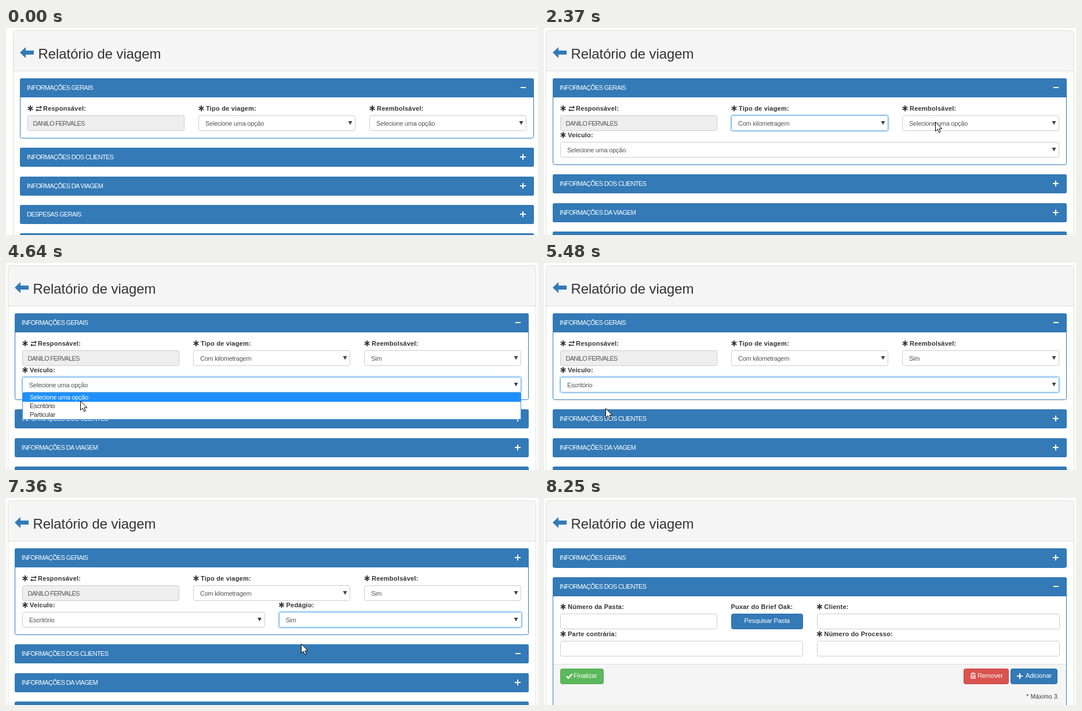
Animation of 918 by 358 pixels, one loop 8820 ms. Source, as an HTML page:

```html
<!DOCTYPE html>
<html lang="pt-BR">
<head>
<meta charset="utf-8">
<title>Relatório de viagem</title>
<style>
html, body { margin: 0; width: 100%; height: 100%; overflow: hidden; background: #fff; }
svg { display: block; }
text { font: 11px "Liberation Sans", Arial, sans-serif; letter-spacing: -.25px; fill: #555; white-space: pre; }
.h1 { font-size: 24px; letter-spacing: -.08px; fill: #333; }
.cap { letter-spacing: -.68px; fill: #fff; }
.name { letter-spacing: -.75px; }
.label { font-weight: bold; letter-spacing: .22px; fill: #333; }
.btn { letter-spacing: -.1px; fill: #fff; }
.opt { fill: #333; }
.on { fill: #fff; }
.note { font-size: 10px; letter-spacing: .35px; fill: #333; }
</style>
</head>
<body>
<svg id="stage" width="918" height="358" viewBox="0 0 918 358"></svg>
<script>
const LOOP = 8820, BLUE = '#337ab7', GRAY = '#ddd';
const stage = document.getElementById('stage');

// Bursts of screen updates: start, end, number of steps
const BURSTS = [
  [50, 500, 8], [750, 1320, 9], [1620, 1620, 1], [1820, 2370, 10], [2620, 3000, 7],
  [3270, 3270, 1], [3430, 3430, 1], [3680, 4520, 13], [4590, 5050, 8],
  [5360, 6120, 12], [6440, 6930, 9], [7360, 7700, 6], [7870, 8250, 7]
];
// Pointer path: time, x, y
const POINTER = [
  [50, 822, 345], [500, 554, 172], [750, 554, 172], [880, 554, 170], [1320, 483, 202],
  [1619, 483, 202], [1620, 483, 203], [1820, 483, 203], [2370, 675, 162], [2620, 675, 162],
  [3000, 675, 200], [3269, 675, 200], [3270, 676, 200], [3680, 676, 200], [4520, 145, 212],
  [4590, 128, 238], [5050, 95, 252], [5360, 95, 252], [6120, 555, 208], [6440, 555, 208],
  [6720, 490, 246], [6930, 509, 252], [7360, 509, 252], [7480, 509, 240], [7870, 509, 240],
  [8187, 733, 342]
];

const clamp = v => Math.max(0, Math.min(1, v));
const within = (t, a, b) => t >= a && t < b;
const swing = (t, start, len) => .5 - Math.cos(Math.PI * clamp((t - start) / len)) / 2;
const grow = (full, r, bump) => full * r + bump * r * (1 - r);

function snap(t) {
  let at = 0;
  for (const [start, end, n] of BURSTS) {
    if (t < start) break;
    const step = (end - start) / (n - 1 || 1);
    at = step ? Math.min(end, start + Math.floor((t - start) / step + .2) * step) : start;
  }
  return at;
}

function pointerAt(t) {
  const i = POINTER.findIndex(p => p[0] > t);
  if (i < 0) return POINTER[POINTER.length - 1].slice(1);
  if (!i) return POINTER[0].slice(1);
  const [a, b] = [POINTER[i - 1], POINTER[i]];
  const u = (t - a[0]) / (b[0] - a[0]), k = u * u * (3 - 2 * u);
  return [1, 2].map(j => Math.round(a[j] + (b[j] - a[j]) * k));
}

const text = (x, y, s, cls = '', extra = '') => `<text x="${x}" y="${y}" class="${cls}" ${extra}>${s}</text>`;
const rect = (x, y, w, h, fill, extra = '') =>
  `<rect x="${x}" y="${y}" width="${Math.max(0, w)}" height="${Math.max(0, h)}" fill="${fill}" ${extra}/>`;
const box = (x, y, w, h, fill, line, r = 3) => rect(x + .5, y + .5, w - 1, h - 1, fill, `stroke="${line}" rx="${r}"`);
const path = (x, y, d, attrs) => `<path transform="translate(${x} ${y})" d="${d}" ${attrs}/>`;
const clip = (y, h, body, opacity) => h < .5 ? '' :
  `<svg x="0" y="${y}" width="930" height="${h}" viewBox="0 ${y} 930 ${h}" opacity="${opacity}">${body}</svg>`;

const star = (x, y) => path(x + 5, y - 4, 'M0-5V5M-4.3-2.5L4.3 2.5M-4.3 2.5L4.3-2.5', 'stroke="#333" stroke-width="2"');
const swap = (x, y) => path(x, y - 9, 'M1 2.5H8V0L11 3 8 6V4H1ZM10 7.5H3V5.5L0 8 3 10.5V9H10Z', 'fill="#333"');
const plus = (x, y, s = 5) => path(x, y, `M${-s} 0H${s}M0 ${-s}V${s}`, 'stroke="#fff" stroke-width="2"');
const minus = (x, y) => rect(x - 4, y - 1, 9, 2, '#fff');

function label(x, y, s, icon) {
  return star(x, y) + (icon ? swap(x + 14, y) : '') + text(x + (icon ? 27 : 13), y, s, 'label');
}

function control(x, y, w, glow) {
  x = Math.round(x); w = Math.round(w);
  return (glow ? rect(x - 1, y - 1, w + 2, 29, 'none', 'rx="4" stroke="#66afe9" stroke-opacity=".35" stroke-width="2"') : '') +
    box(x, y, w, 27, '#fff', glow ? '#66afe9' : '#ccc');
}

function select(x, y, w, value, glow) {
  return control(x, y, w, glow) + text(x + 12, y + 18, value) +
    path(x + w - 9, y + 10, 'M-3.5 0H3.5L0 6.5Z', 'fill="#444"');
}

function button(x, y, w, fill, line, s, dx, icon = '') {
  return box(x, y, w, 27, fill, line) + icon + text(x + dx, y + 16, s, 'btn');
}

function list(x, y, w, items, mouseY) {
  const row = Math.floor((mouseY - y - 1) / 15);
  const active = row >= 0 && row < items.length ? row : 0;
  return box(x, y, w, 47, '#fff', '#3c8fe0', 0) + items.map((s, i) =>
    (i === active ? rect(x + 1, y + 1 + 15 * i, w - 2, 15, '#1e90ff') : '') +
    text(x + 13, y + 12 + 15 * i, s, i === active ? 'on' : 'opt')).join('');
}

function panel(y, h, title, open) {
  y = Math.round(y); h = Math.round(h);
  return box(15, y, 887, h, '#fff', BLUE) + rect(15, y, 887, 33, BLUE, 'rx="3"') +
    (h > 36 ? rect(15, y + 10, 887, 23, BLUE) : '') +
    text(27, y + 20, title, 'cap') + (open ? minus : plus)(883, y + 16);
}

// Columns of a body shown at ratio r of its full width
function grid(r) {
  const pad = 13.2 * r, left = 16 + pad - 13.2, width = 885 * r - 2 * pad + 26.4;
  return { pad, x: f => left + width * f + 12, w: f => width * f - 24 };
}

function wrap(s, width) {
  const lines = [''];
  for (const word of s.split(' ')) {
    const last = lines[lines.length - 1], joined = last ? last + ' ' + word : word;
    if (last && joined.length * 6.2 > width) lines.push(word);
    else lines[lines.length - 1] = joined;
  }
  return lines;
}

const NONE = 'Selecione uma opção';

function general(t, r) {
  const g = grid(r), third = g.w(1 / 3), y = Math.round(130 + g.pad);
  const toll = t > 5450, x2 = g.x(1 / 3), x3 = g.x(2 / 3), half = g.x(.5);
  let s = label(g.x(0), y, 'Responsável:', true) +
    box(Math.round(g.x(0)), y + 8, Math.round(third), 27, '#eee', '#ccc') +
    text(g.x(0) + 9.5, y + 26, 'DANILO FERVALES', 'name') +
    label(x2, y, 'Tipo de viagem:') +
    select(x2, y + 8, third, t < 1815 ? NONE : 'Com kilometragem', within(t, 900, 2700)) +
    label(x3, y, 'Reembolsável:') +
    select(x3, y + 8, third, t < 3425 ? NONE : 'Sim', within(t, 2700, 3950));
  if (t > 1860) s += label(g.x(0), y + 46, 'Veículo:') +
    select(g.x(0), y + 54, g.w(toll ? .5 : 1), t < 5355 ? NONE : 'Escritório', within(t, 4500, 6500));
  if (toll) s += label(half, y + 46, 'Pedágio:') +
    select(half, y + 54, g.w(.5), t < 6800 ? NONE : 'Sim', t >= 6500);
  return s;
}

function clients(top, r) {
  const g = grid(r), y = Math.round(top + 10 + g.pad), a = g.x(0), b = g.x(1 / 3), c = g.x(.5);
  const lines = wrap('Puxar do Brief Oak:', g.w(1 / 6)), bw = Math.round(g.w(1 / 6));
  const drop = g.w(1 / 3) < 114 ? 15 : 0, low = y + 47 + 15 * (lines.length - 1);
  return label(a, y, 'Número da Pasta:') + control(a, y + 8 + drop, g.w(1 / 3)) +
    lines.map((s, i) => text(b - .5, y + 15 * i, s, 'label')).join('') +
    button(Math.round(b), low - 39, bw, BLUE, '#2e6da4', 'Pesquisar Pasta', bw / 2 - 39.5) +
    label(c, y, 'Cliente:') + control(c, y + 8, g.w(.5)) +
    label(a, low, 'Parte contrária:') + control(a, low + 8, g.w(.5)) +
    label(c, low, 'Número do Processo:') + control(c, low + 8, g.w(.5));
}

function footer(top, r) {
  const x = Math.round(16 + 12 * r), right = Math.round(13 + 873 * r), y = Math.round(top + 8 * r);
  const check = path(x + 10, y + 8, 'M1 5.5L4 8.5 10.5 1.5', 'fill="none" stroke="#fff" stroke-width="2.6"');
  const bin = path(right - 150, y + 7, 'M0 2H9M3 2V.5H6V2M1 3.5V10H8V3.5M3.2 4V9M5.8 4V9', 'fill="none" stroke="#fff" stroke-width="1.2"');
  return rect(16, top, 885 * r, 90, '#f5f5f5') + rect(16, top, 885 * r, 1, GRAY) +
    button(x, y, 75, '#5cb85c', '#4cae4c', 'Finalizar', 23, check) +
    button(right - 162, y, 78, '#d9534f', '#d43f3a', 'Remover', 24, bin) +
    button(right - 81, y, 81, BLUE, '#2e6da4', 'Adicionar', 26, plus(right - 65, y + 13)) +
    text(right + 3, y + 52, '* Máximo 3.', 'note', 'text-anchor="end"');
}

function scene(t) {
  const [mx, my] = pointerAt(t);
  const dx = t < 1860 ? 9 : 0, toggled = t > 7355;
  const r1 = 1 - swing(t, 7360, 336), r2 = swing(t, 7360, 290), r3 = swing(t, 7360, 324);
  const h1 = 33.4 + Math.max(.6, grow(t < 1860 ? 70.7 : 117, r1, 61));
  const hBody = grow(118, r2, 36), hFoot = grow(80, r3, 8);
  const y2 = 87 + h1 + 16, h2 = 33.4 + hBody + hFoot;
  const bodyTop = Math.round(y2) + 32, footTop = Math.round(bodyTop + hBody);

  let s = box(3, 4, 912, 400, '#fff', GRAY) + rect(4, 5, 910, 69, '#f5f5f5') + rect(4, 74, 910, 1, GRAY) +
    path(15, 33, 'M0 9.5L10 0V6H24V13H10V19Z', `fill="${BLUE}"`) +
    text(46.5, 53, 'Relatório de viagem', 'h1');

  s += panel(87, h1, 'INFORMAÇÕES GERAIS', !toggled) + clip(120, Math.round(h1) - 34, general(t, r1), r1);
  s += panel(y2, h2, 'INFORMAÇÕES DOS CLIENTES', toggled) +
    clip(bodyTop, footTop - bodyTop, clients(bodyTop, r2), r2) +
    clip(footTop, Math.round(y2) + Math.round(h2) - 1 - footTop, footer(footTop, r3), r3);
  ['INFORMAÇÕES DA VIAGEM', 'DESPESAS GERAIS', 'ANEXOS'].forEach((title, i) => {
    const y = y2 + h2 + 16 + 49.4 * i;
    if (y < 358) s += panel(y, 33.4, title, false);
  });

  if (within(t, 800, 900)) s += rect(323, 178, 271, 47, '#fff');
  if (within(t, 900, 1815)) s += list(323, 178, 271, [NONE, 'Com kilometragem', 'Sem kilometragem'], my);
  if (within(t, 2640, 3425)) s += list(618, 178, 271, [NONE, 'Sim', 'Não'], my);
  if (within(t, 4400, 5355)) s += list(28, 224, 861, [NONE, 'Escritório', 'Particular'], my);
  if (within(t, 6439, 6800)) s += list(471, 224, 418, [NONE, 'Sim', 'Não'], my);

  s = `<g transform="translate(${dx} 0)">${s}</g>`;
  if (within(t, 50, 8249)) s += path(mx + .5, my + .5,
    'M0 0V16L3.7 12.6 6.2 18.3 8.7 17.2 6.3 11.7H11.3Z', 'fill="#fff" stroke="#000"');
  return s;
}

let shown = -1;
function frame(now) {
  const t = snap(now % LOOP);
  if (t !== shown) stage.innerHTML = scene(shown = t);
  requestAnimationFrame(frame);
}
stage.innerHTML = scene(shown = 0);
requestAnimationFrame(frame);
</script>
</body>
</html>
```
